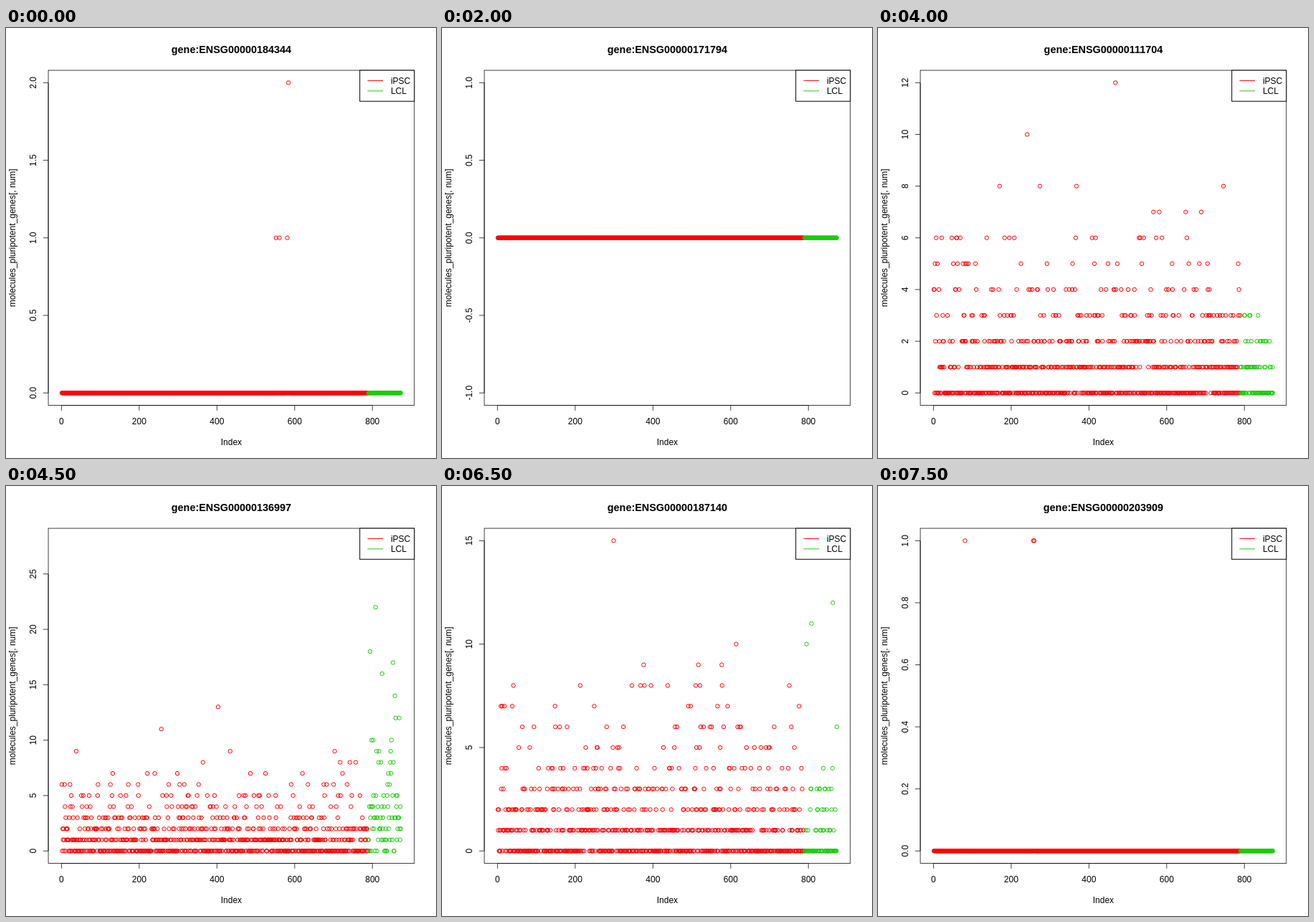
An HTML page with a canvas that plays this animation: 600x600 px, repeating every 8 s.

```html
<!DOCTYPE html>
<html lang="en">
<head>
<meta charset="utf-8">
<title>Gene counts</title>
<style>
html, body { margin: 0; width: 100%; height: 100%; overflow: hidden; background: #fff; }
canvas { display: block; width: 600px; height: 600px; }
</style>
</head>
<body>
<canvas id="c" width="600" height="600"></canvas>
<script>
const ctx = document.getElementById('c').getContext('2d');
const RED = '#ff0000', GREEN = '#1ccb0a', BLACK = '#000';
const FONT = '"Liberation Sans", Arial, Helvetica, sans-serif';
const HOLD = 500, COUNT = 873, FIRST_GREEN = 790;

// Plot region and the data area inside its 4% padding
const L = 59.04, T = 59.04, R = 569.76, B = 526.56;
const X1 = L + (R - L) * 0.04 / 1.08, DX = (R - L) / 1.08 / (COUNT - 1);
const Y0 = B - (B - T) * 0.04 / 1.08, YH = (B - T) / 1.08;
const MID = (L + R) / 2;

const xOf = i => X1 + (i - 1) * DX;

// rate: chance of a count above 0, q: geometric ratio, cap: top random count,
// fade: index scale over which the rate dies away
const counts = (rate, q, cap, fade = Infinity) => ({ rate, q, cap, fade });
const none = counts(0, 0.5, 1);

// peaks: [index, value]
const slide = (id, max, step, peaks = [], red = none, green = none) =>
  ({ id, min: 0, max, step, peaks, red, green });
const flat = id => ({ ...slide(id, 1, 0.5), min: -1 });

const slides = [
  slide('184344', 2, 0.5, [[552, 1], [561, 1], [581, 1], [584, 2]]),
  slide('141448', 4, 1, [[182, 4]], counts(0.06, 0.3, 2, 150)),
  flat('148200'),
  slide('128567', 1, 0.2, [[66, 1], [414, 1]]),
  flat('171794'),
  flat('229544'),
  slide('143768', 9, 2,
    [[17, 9], [43, 9], [150, 5], [183, 5], [122, 4], [138, 3], [292, 3], [560, 3], [600, 3]],
    counts(0.22, 0.25, 2, 250)),
  slide('156574', 2, 0.5, [[172, 2], [845, 1]], counts(0.01, 0.5, 1)),
  slide('111704', 12, 2, [[241, 10], [468, 12]], counts(0.58, 0.58, 8), counts(0.4, 0.4, 4)),
  slide('136997', 28, 5,
    [[257, 11], [403, 13], [794, 18], [808, 22], [825, 16], [853, 17], [858, 14]],
    counts(0.63, 0.61, 9), counts(0.87, 0.84, 13)),
  slide('163530', 1, 0.2, [[114, 1], [348, 1], [497, 1]]),
  flat('164362'),
  slide('181449', 5, 1, [[222, 3], [431, 5]], counts(0.02, 0.2, 2)),
  slide('187140', 15, 5,
    [[299, 15], [614, 10], [795, 10], [808, 11], [863, 12], [873, 6]],
    counts(0.6, 0.64, 9), counts(0.3, 0.6, 7)),
  slide('185551', 16, 5, [[362, 11], [617, 13], [134, 16]], counts(0.62, 0.6, 9), counts(0.6, 0.55, 6)),
  slide('203909', 1, 0.2, [[81, 1], [257, 1], [259, 1]])
];

function rng(seed) {
  return () => {
    seed = (seed + 0x6D2B79F5) | 0;
    let t = Math.imul(seed ^ (seed >>> 15), 1 | seed);
    t = (t + Math.imul(t ^ (t >>> 7), 61 | t)) ^ t;
    return ((t ^ (t >>> 14)) >>> 0) / 4294967296;
  };
}

function samples(s, seed) {
  const rand = rng(seed), vals = [];
  for (let i = 1; i <= COUNT; i++) {
    const { rate, q, cap, fade } = i < FIRST_GREEN ? s.red : s.green;
    const hit = rand() < rate * Math.exp(-i / fade);
    const v = 1 + Math.floor(Math.log(1 - rand()) / Math.log(q));
    vals[i] = hit ? v % (cap + 1) : 0;
  }
  for (const [i, v] of s.peaks) vals[i] = v;
  return vals;
}

function line(x1, y1, x2, y2, color = BLACK) {
  ctx.strokeStyle = color;
  ctx.beginPath();
  ctx.moveTo(x1, y1);
  ctx.lineTo(x2, y2);
  ctx.stroke();
}

function text(str, x, y, { turn = false, align = 'center', font = '12px ' } = {}) {
  ctx.save();
  ctx.translate(x, y);
  if (turn) ctx.rotate(-Math.PI / 2);
  ctx.font = font + FONT;
  ctx.textAlign = align;
  ctx.fillStyle = BLACK;
  ctx.fillText(str, 0, 0);
  ctx.restore();
}

function axes(s, yOf) {
  ctx.lineWidth = 0.75;
  ctx.strokeStyle = BLACK;
  ctx.strokeRect(L, T, R - L, B - T);

  line(xOf(0), B, xOf(800), B);
  for (let v = 0; v <= 800; v += 200) {
    line(xOf(v), B, xOf(v), B + 7.2);
    text(v, xOf(v), 552.8);
  }

  const n = Math.floor((s.max - s.min) / s.step + 1e-6);
  line(L, yOf(s.min), L, yOf(s.min + n * s.step));
  for (let k = 0; k <= n; k++) {
    const v = s.min + k * s.step, y = yOf(v);
    line(L, y, L - 7.2, y);
    text(v.toFixed(s.step < 1 ? 1 : 0), 42, y, { turn: true });
  }

  text('gene:ENSG00000' + s.id, MID, 35, { font: 'bold 14.4px ' });
  text('Index', MID, 581.8);
  text('molecules_pluripotent_genes[, num]', 13.2, (T + B) / 2, { turn: true });
}

function legend() {
  const x = 493.7;
  ctx.lineWidth = 1;
  ctx.fillStyle = '#fff';
  ctx.fillRect(x, T, R - x, 43.2);
  ctx.strokeStyle = BLACK;
  ctx.strokeRect(x, T, R - x, 43.2);
  [['iPSC', RED], ['LCL', GREEN]].forEach(([name, color], k) => {
    const y = T + 14.4 * (k + 1);
    line(x + 10.8, y, x + 32.4, y, color);
    text(name, x + 43.2, y + 4.4, { align: 'left' });
  });
}

function draw(k) {
  const s = slides[k];
  const yOf = v => Y0 - (v - s.min) / (s.max - s.min) * YH;
  ctx.fillStyle = '#fff';
  ctx.fillRect(0, 0, 600, 600);
  ctx.lineWidth = 1;
  samples(s, k + 1).forEach((v, i) => {
    ctx.strokeStyle = i < FIRST_GREEN ? RED : GREEN;
    ctx.beginPath();
    ctx.arc(xOf(i), yOf(v), 2.7, 0, Math.PI * 2);
    ctx.stroke();
  });
  axes(s, yOf);
  legend();
}

let shown = -1;
const start = performance.now();
function tick() {
  const k = Math.floor((performance.now() - start) / HOLD) % slides.length;
  if (k !== shown) draw(shown = k);
  requestAnimationFrame(tick);
}
tick();
</script>
</body>
</html>
```
